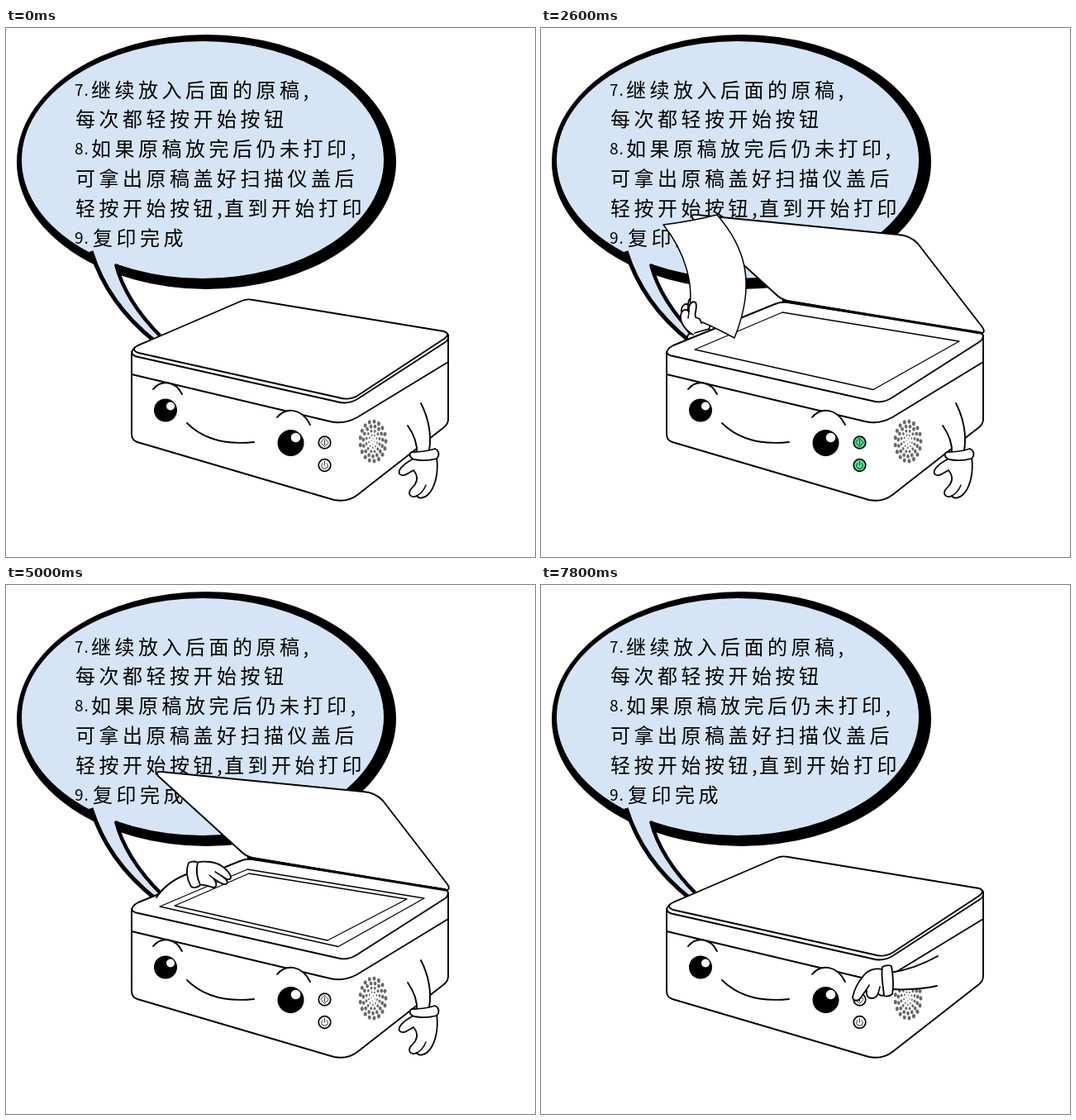
An HTML page with a canvas for the animation above (8000 ms loop, 640 by 640 pixels).

```html
<!DOCTYPE html>
<html lang="zh">
<head>
<meta charset="utf-8">
<style>
html, body { margin: 0; width: 100%; height: 100%; overflow: hidden; background: #fff; }
canvas { display: block; width: 640px; height: 640px; }
</style>
</head>
<body>
<canvas id="stage" width="640" height="640"></canvas>
<script>
const ctx = document.getElementById('stage').getContext('2d');
const BLUE = '#d6e5f6', GREEN = '#4be992', INK = '#000';
const LOOP = 8000;

// lid, hand action, lit buttons
const steps = [
  ['closed', '', 0], ['closed', '', 1], ['ajar', '', 1], ['half', 'raised', 0],
  ['open', 'place', 0], ['open', 'slide', 1], ['open', 'sheet', 1], ['open', 'low', 0],
  ['open', 'away', 0], ['open', 'low', 1], ['open', 'sheet', 1], ['open', 'slide', 0],
  ['open', 'place', 0], ['open', 'raised', 1], ['open', 'raised', 0], ['half', 'raised', 0],
  ['ajar', '', 1], ['closed', '', 1], ['closed', '', 0], ['closed', 'press', 0]
];

const lids = {
  closed: 'M283 331Q290 327 299 329L530 367Q538 370 530 376L425 445Q415 451 402 447L160 393Q150 389 160 384Z',
  ajar: 'M286 327Q291 330 298 331L530 370Q536 370 531 367L432 385Q422 387 408 383L165 336Q154 333 166 331Z',
  half: 'M170 263L412 296Q426 298 437 305L531 366Q536 370 528 369L298 330Q291 329 284 325L169 267Q165 263 170 263Z',
  open: 'M188 226L432 250Q447 251 456 261L534 362Q539 370 530 369L298 330Q290 328 284 322L184 231Q180 225 188 226Z'
};

function draw(d, fill, width = 1.9, color = INK) {
  const p = new Path2D(d);
  if (fill) { ctx.fillStyle = fill; ctx.fill(p); }
  if (width) { ctx.lineWidth = width; ctx.strokeStyle = color; ctx.stroke(p); }
}

function oval(x, y, rx, ry, fill, width = 0) {
  ctx.beginPath();
  ctx.ellipse(x, y, rx, ry, 0, 0, Math.PI * 2);
  ctx.fillStyle = fill;
  ctx.fill();
  if (width) { ctx.lineWidth = width; ctx.strokeStyle = INK; ctx.stroke(); }
}

function setType(size, gap) {
  ctx.font = `400 ${size}px "Noto Sans CJK SC", "Noto Sans CJK", sans-serif`;
  ctx.letterSpacing = gap + 'px';
}

function bubble() {
  oval(242.5, 162, 229.5, 154, INK);
  oval(238, 159.5, 219, 143.5, BLUE);
  draw('M104 271C118 315 146 352 180 380L189 375C160 345 141 318 132 285L128 268Z', BLUE, 0);
  ctx.lineCap = 'butt';
  draw('M103 270C117 315 146 352 180 379', null, 5);
  draw('M133 286C141 317 160 346 188 374', null, 4.5);
  ctx.lineCap = 'round';

  ctx.fillStyle = INK;
  ctx.textBaseline = 'middle';
  setType(24, 4.5);
  ctx.fillText('继续放入后面的原稿,', 103, 74.5);
  ctx.fillText('每次都轻按开始按钮', 84, 110);
  ctx.fillText('如果原稿放完后仍未打印,', 103, 146);
  ctx.fillText('可拿出原稿盖好扫描仪盖后', 84, 182);
  ctx.fillText('轻按开始按钮,', 84, 218);
  ctx.fillText('直到开始打印', 264, 218);
  ctx.fillText('复印完成', 105, 254);
  setType(19, 1);
  ctx.fillText('7.', 83, 75);
  ctx.fillText('8.', 83, 146);
  ctx.fillText('9.', 83, 254);
}

function base() {
  draw('M152 394Q152 388 160 384L283 334Q290 331 298 332L530 368Q535 369 535 374L535 473Q535 479 530 483L425 565Q413 574 397 571L159 501Q152 499 152 491Z', '#fff');
  draw('M152 419L392 476Q409 480 425 471L535 404');
}

function deck(paper, dx, dy) {
  draw('M152 392Q153 396 160 397L400 451Q413 455 425 447L530 380Q535 377 535 372');
  draw('M186 389L292 344L506 379L402 437.5Z', '#fff', 1.3);
  if (paper) {
    ctx.save();
    ctx.translate(dx, dy);
    draw('M204 388L294 349L485 380L389 430Z', '#fff', 1.3);
    ctx.restore();
  }
  draw('M293 330L532 369', null, 3);
}

function button(y, lit) {
  oval(385.5, y, 7.3, 7.3, lit ? GREEN : '#fff', 1.7);
}

function speaker() {
  const rings = [[1, 17, 2], [.76, 15, 1.8], [.53, 12, 1.4], [.32, 9, .9], [.14, 4, .6]];
  for (const [k, n, r] of rings) {
    for (let i = 0; i < n; i++) {
      const a = (i + k) / n * Math.PI * 2;
      oval(444 + Math.cos(a) * 15.5 * k, 500 + Math.sin(a) * 24 * k, r, r * 1.35, '#686868');
    }
  }
}

function face(lit) {
  draw('M178 437C188 425 205 427 213 443', '#fff');
  draw('M328 471C339 458 358 460 368 480', '#fff');
  oval(193, 462.5, 14, 14, INK);
  oval(199, 457.5, 5, 5, '#fff');
  oval(344.5, 502, 16, 16, INK);
  oval(350.5, 495.5, 5.8, 5.8, '#fff');
  draw('M219 478C236 495 262 505 300 501');
  button(501.5, lit);
  draw('M385.5 496.5L390 501.5L385.5 506.5L381 501.5ZM385.5 499V504', null, .8);
  button(529, lit);
  draw('M383 526.5A3.8 3.8 0 1 0 388 526.5M385.5 524.5V529', null, .8);
  speaker();
}

function restArm() {
  draw('M502 454C512 474 516 492 513 511L497 515C498 501 493 491 486 481Z', '#fff', 0);
  draw('M502 454C512 474 515 492 512 511M486 481C493 491 498 502 497 515');
  draw('M495 520C487 524 479 529 476 535C474 541 480 543 486 539L493 535C498 541 498 547 495 552L489 559C486 565 491 569 497 566C499 570 506 569 510 565C518 558 524 540 521 519Z', '#fff', 1.8);
  draw('M497 566C503 563 506 558 508 553', null, 1.5);
  draw('M491 513C501 513 510 512 519 509C524 511 525 517 521 521C513 523 503 524 494 522C488 520 487 515 491 513Z', '#fff', 1.8);
}

function pressArm() {
  draw('M423 469C443 466 462 459 480 449L479 486C460 490 442 490 424 488Z', '#fff', 0);
  draw('M423 469C443 466 462 459 480 449M424 489C442 490 460 489 479 485');
  draw('M413 465C404 463 395 466 390 473C384 480 379 489 377 499C378 504 384 504 387 499L394 489C393 496 395 500 400 500C405 500 407 497 408 494C411 499 416 497 418 491Z', '#fff', 1.8);
  draw('M394 489L397 484M408 494L410 486', null, 1.5);
  draw('M413 462Q419 459 424 461C426 473 427 484 425 495Q420 499 415 497C414 484 411 474 413 462Z', '#fff', 1.8);
}

function raisedHand() {
  draw('M181 372C173 362 169 350 170 344C169 337 174 332 178 335C178 328 183 322 187 326C189 330 186 341 187 347C189 340 195 336 199 336C203 338 200 344 197 348C202 342 208 339 210 343C210 350 204 360 202 368Z', '#fff', 1.8);
  draw('M178 335L177 346M187 347L186 352', null, 1.5);
  draw('M178 371Q190 368 203 364Q208 367 204 373L182 379Q175 377 178 371Z', '#fff', 1.8);
}

function sheet() {
  draw('M148 238Q181 234 213 226C245 263 262 306 234 375Q207 360 178 349C187 312 174 270 148 238Z', '#fff', 1.5);
  draw('M184 371C174 365 168 356 169 348C170 341 175 339 179 343C178 336 182 329 187 332C190 338 185 345 187 350L192 352L194 357', '#fff', 1.8);
  draw('M179 343L178 351', null, 1.5);
}

function lowHand() {
  draw('M154 419C137 418 112 422 95 437C88 445 94 455 103 464L122 484Q140 478 156 462Z', '#fff', 1.5);
  draw('M153 433C140 432 135 440 139 447Q145 454 154 455', '#fff', 1.5);
  draw('M148 392C138 393 128 399 123 408C119 417 119 425 122 427C126 428 128 420 131 414C128 423 126 430 129 432C134 433 136 425 139 419L152 420Z', '#fff', 1.8);
  draw('M149 391Q153 386 158 388V434H150C148 420 147 404 149 391Z', '#fff', 1.8);
}

function placeHand(dx, dy) {
  draw(`M182 378C190 366 204 355 ${221 + dx} ${349 + dy}L${224 + dx} ${363 + dy}L201 371Z`, '#fff', 0);
  draw(`M182 378C190 366 204 355 ${221 + dx} ${349 + dy}`);
  ctx.save();
  ctx.translate(dx, dy);
  draw('M230 336C240 333 254 335 261 340C267 344 272 350 272 354C271 358 266 356 261 352C267 356 270 360 266 362C261 363 256 358 251 355C255 360 256 365 251 366C245 365 240 361 232 363Z', '#fff', 1.8);
  draw('M261 352L253 347M251 355L246 351', null, 1.5);
  draw('M221 336Q228 333 232 336C229 345 231 354 235 363Q230 368 224 365C219 356 217 346 221 336Z', '#fff', 1.8);
  ctx.restore();
}

function render(t) {
  const i = t < 500 ? 0 : t < 1000 ? 1 : 2 + Math.floor((t - 1000) / 400);
  const [lid, hand, lit] = steps[Math.min(i, steps.length - 1)];
  const [dx, dy] = hand === 'slide' ? [-27, -8] : [0, 0];
  ctx.fillStyle = '#fff';
  ctx.fillRect(0, 0, 640, 640);
  ctx.lineCap = ctx.lineJoin = 'round';
  bubble();

  const raised = lid === 'open' || lid === 'half';
  if (raised) draw(lids[lid], '#fff');
  if (hand === 'raised' || hand === 'sheet') raisedHand();
  if (hand === 'low') lowHand();
  base();
  if (lid === 'closed') {
    draw('M152 392Q153 397 160 398L400 452Q413 456 425 449L530 381Q536 378 535 371');
  } else {
    deck(!['sheet', 'low', 'away'].includes(hand), dx, dy);
  }
  if (!raised) draw(lids[lid], '#fff');
  if (hand === 'sheet') sheet();
  if (hand === 'place' || hand === 'slide') placeHand(dx, dy);
  face(lit);
  if (hand === 'press') pressArm(); else restArm();
}

const start = performance.now();
function tick() {
  render((performance.now() - start) % LOOP);
  requestAnimationFrame(tick);
}
tick();
</script>
</body>
</html>
```
